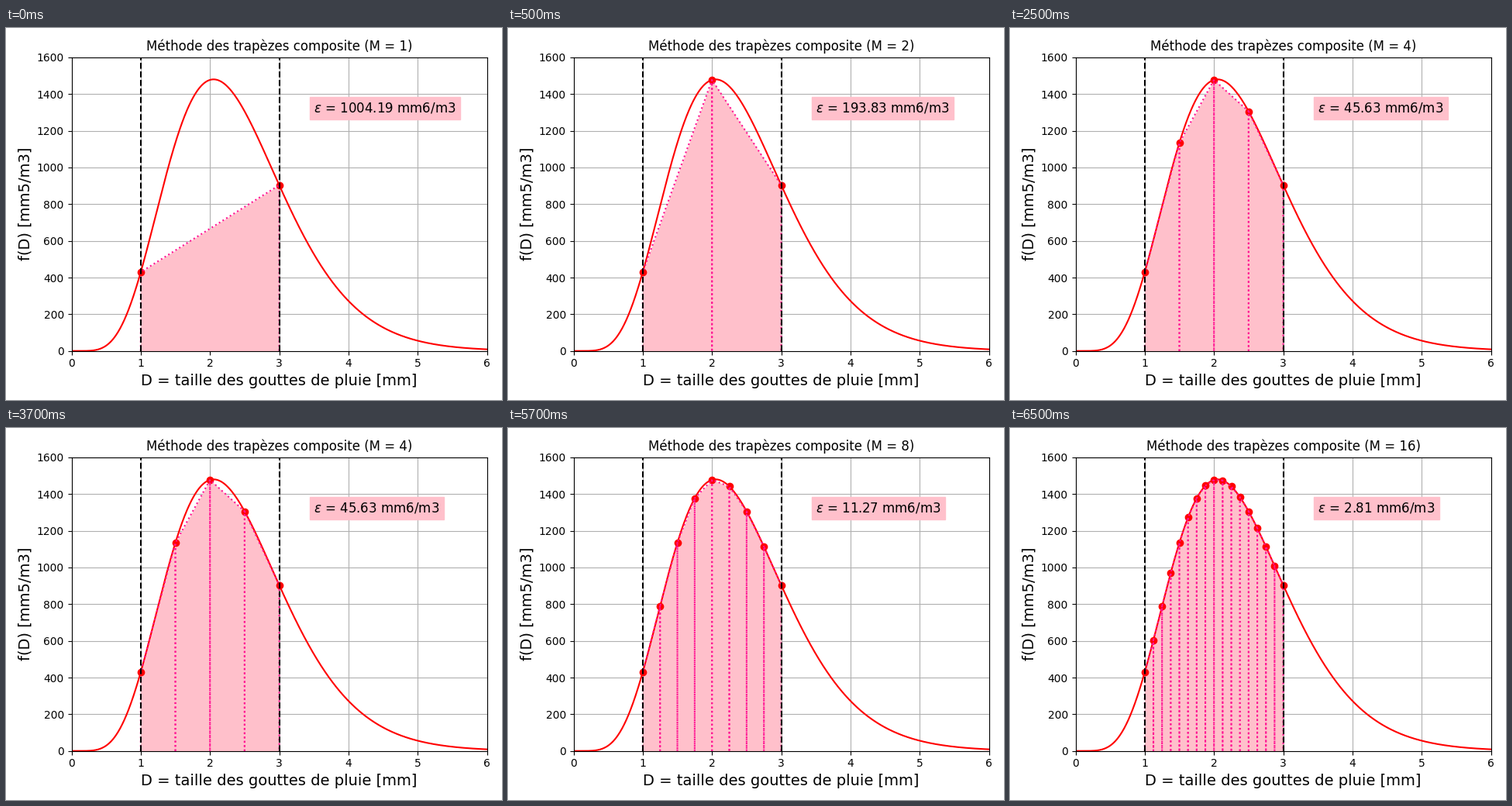
These frames come from a looping animation (640 px wide and 480 px high, 8 s). A matplotlib script:

```python
import numpy as np
import matplotlib.pyplot as plt
from matplotlib.animation import FuncAnimation

A, B = 1, 3
RAIN_RATE = 5
SLOPE = 4.1 * RAIN_RATE ** -0.21
STEP_MS = 500
SCHEDULE = [1] + [2] * 4 + [4] * 4 + [8] * 4 + [16] * 3


def f(d):
    """Sixth-moment integrand of an exponential drop-size distribution."""
    return 8000 * d ** 6 * np.exp(-SLOPE * d)


def trapezoid(m):
    y = f(np.linspace(A, B, m + 1))
    return (B - A) / m * (y.sum() - (y[0] + y[-1]) / 2)


EXACT = trapezoid(100000)

fig, ax = plt.subplots(figsize=(6.4, 4.8), dpi=100)


def draw(i):
    m = SCHEDULE[i]
    ax.clear()
    d = np.linspace(0, 6, 1000)
    ax.plot(d, f(d), color="red")

    nodes = np.linspace(A, B, m + 1)
    ax.scatter(nodes, f(nodes), color="red", zorder=1.8)
    ax.fill_between(nodes, f(nodes), color="pink", linewidth=0, zorder=1)
    for left, right in zip(nodes[:-1], nodes[1:]):
        ax.plot([left, left, right, right], [0, f(left), f(right), 0],
                ":", color="deeppink")
    for bound in (A, B):
        ax.axvline(bound, color="black", linestyle="--")

    error = abs(EXACT - trapezoid(m))
    ax.text(3.5, 1300, rf"$\varepsilon$ = {error:.2f} mm6/m3", fontsize=12,
            bbox=dict(facecolor="pink", edgecolor="pink"))
    ax.set_title(f"Méthode des trapèzes composite (M = {m})", fontsize=12)
    ax.set_xlabel("D = taille des gouttes de pluie [mm]", fontsize=14)
    ax.set_ylabel("f(D) [mm5/m3]", fontsize=14)
    ax.set_xlim(0, 6)
    ax.set_ylim(0, 1600)
    ax.set_axisbelow(True)
    ax.grid(True)


draw(0)
fig.tight_layout()
anim = FuncAnimation(fig, draw, frames=len(SCHEDULE), interval=STEP_MS,
                     repeat=True, repeat_delay=0)
plt.show()
```
